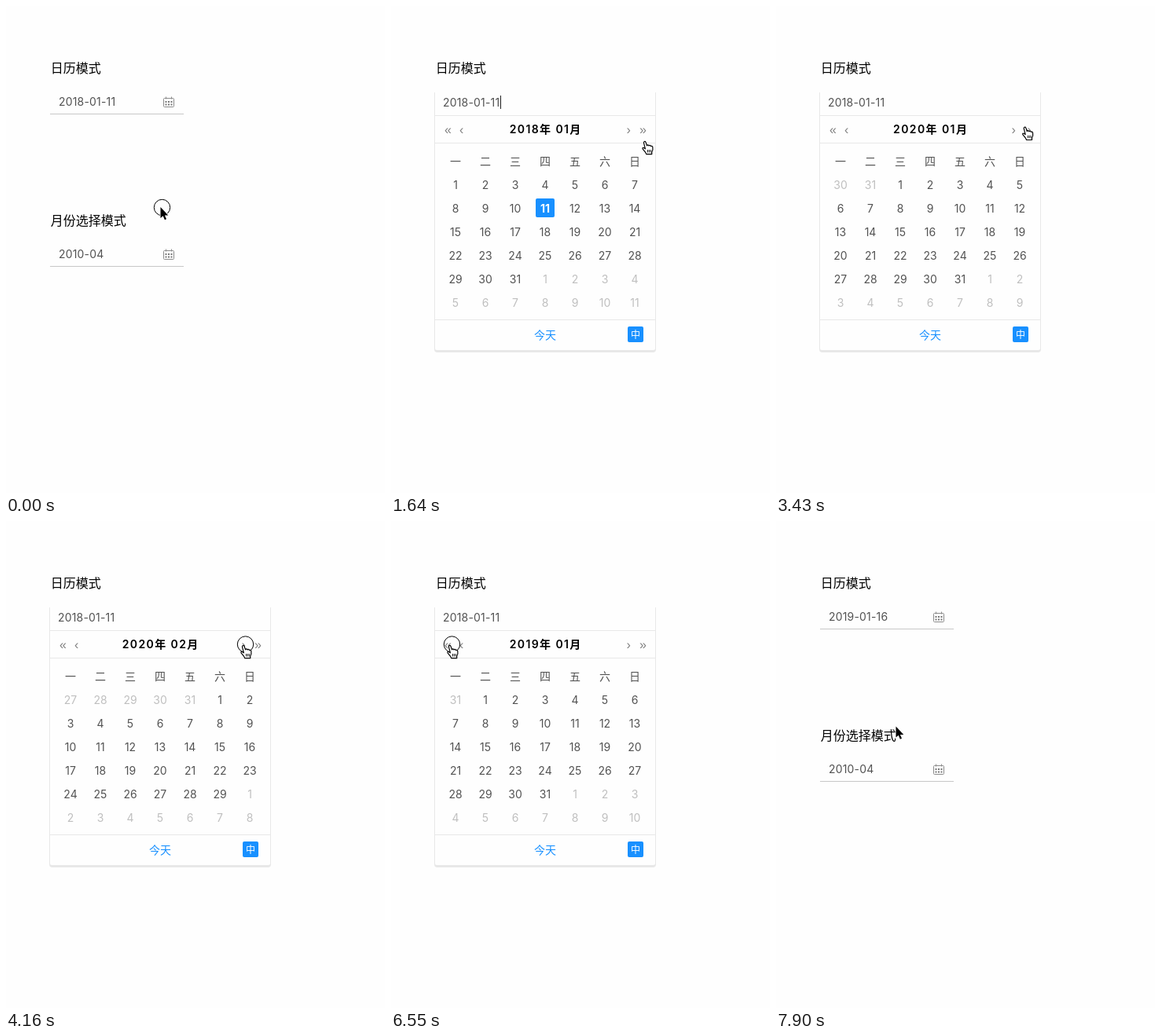
Recreate the animation shown at these times as an HTML page. Size 482 by 620 pixels, loop 8000 ms.

```html
<!DOCTYPE html>
<html lang="zh-CN">
<head>
<meta charset="utf-8">
<title>日历模式</title>
<style>
  html, body { margin: 0; width: 100%; height: 100%; overflow: hidden; background: #fefefe; }
  svg { display: block; width: 482px; height: 620px; }
  text { font: 14px Inter, "Noto Sans CJK SC", "Noto Sans CJK", sans-serif; fill: #525252; }
  .label { font-size: 16px; fill: #000; }
  .date { letter-spacing: .18px; }
  .mid { text-anchor: middle; }
  .title { font-weight: 600; letter-spacing: 1.4px; fill: #000; }
  .nav { font: 16px "Liberation Sans", Arial, sans-serif; fill: #808080; }
  .dim { fill: #bfbfbf; }
  .on { fill: #fff; font-weight: 700; }
  .line { fill: #e8e8e8; }
  .blue { fill: #1890ff; }
  .lang { font-size: 12px; font-weight: 500; fill: #fff; }
  .icon { fill: none; stroke: #8c8c8c; }
  .dots { stroke: #777; stroke-width: 2; stroke-dasharray: 2 1.5; fill: none; }
</style>
</head>
<body>
<svg viewBox="0 0 482 620">
  <defs>
    <g id="cal">
      <rect class="icon" x=".5" y="2.5" width="13" height="11" rx="1"/>
      <path class="icon" d="M3.5 .5v3M10.5 .5v3"/>
      <path class="dots" d="M2.5 7h9M2.5 10.5h9"/>
    </g>
  </defs>

  <text class="label" x="56.7" y="85">日历模式</text>

  <g id="closed">
    <text id="value" class="date" x="67" y="127"></text>
    <use href="#cal" x="200" y="115"/>
    <rect id="under" x="56" y="137" width="170" height="1"/>
    <text class="label" x="56.7" y="279">月份选择模式</text>
    <text class="date" x="67" y="321">2010-04</text>
    <use href="#cal" x="200" y="309"/>
    <rect x="56" y="331" width="170" height="1" fill="#c8c8c8"/>
  </g>

  <g id="popup">
    <path d="M55 110V437q0 4 4 4H333q4 0 4-4V110z" fill="#e8e8e8"/>
    <path d="M56 109V436q0 2 2 2H334q2 0 2-2V109z" fill="#fefefe"/>
    <text id="field" class="date" x="66" y="128"></text>
    <rect id="caret" x="139" y="114" width="1" height="17" fill="#222"/>
    <rect class="line" x="56" y="139" width="280" height="1"/>
    <rect class="line" x="56" y="174" width="280" height="1"/>
    <rect class="line" x="56" y="399" width="280" height="1"/>
    <text class="nav" x="68" y="163">«</text>
    <text class="nav" x="87" y="163">‹</text>
    <text class="nav" x="299.5" y="163">›</text>
    <text class="nav" x="316" y="163">»</text>
    <text id="month" class="title mid" x="196.7" y="162"></text>
    <rect id="cell" width="24" height="24" rx="2"/>
    <g id="grid"></g>
    <text class="mid blue" x="196" y="424">今天</text>
    <rect class="blue" x="301" y="408" width="20" height="20" rx="2"/>
    <text class="mid lang" x="311" y="422.6">中</text>
  </g>

  <circle id="ring" r="10.2" fill="none" stroke="#000"/>
  <path id="arrow" d="M0 0V14L3.200 11.200L5.400 16.200L7.500 15.300L5.400 10.400H9.800z" fill="#000" stroke="#fff" paint-order="stroke" stroke-width="1.4"/>
  <path id="beam" d="M-3 -7.500q3 0 3 2.500V5.500q0 2.500-3 2.500M3 -7.500q-3 0-3 2.500V5.500q0 2.500 3 2.500M-1.500 2.500h3" fill="none" stroke="#000"/>
  <g id="hand" fill="#fff" stroke="#000" stroke-linejoin="round">
    <path stroke-width="1.2" d="M2.500 2.800C2 .8 4.300 .2 5 1.900L6.500 6.300C6.900 5 8.700 5.200 9 6.500C9.500 5.500 11.100 5.800 11.500 7.100C12.100 6.400 13.600 6.800 13.800 8.100C14.400 11 14 12.600 12.700 14.700V17.200H5.700C5.400 15.300 2.800 12.600 1.200 10.600C.3 9.200 1.600 8.300 2.900 9.200L4.400 10.300z"/>
    <path d="M7.500 11.500v3.500M9.400 11.500v3.500M11.300 11.500v3.500" stroke-width=".9"/>
  </g>
</svg>
<script>
const LOOP = 8000, STEP = 149;
const $ = id => document.getElementById(id);
const show = (id, on) => $(id).style.display = on ? '' : 'none';
const place = (id, x, y) => $(id).setAttribute('transform', `translate(${x} ${y})`);

// pointer stops: step, x, y
const path = [
  [0, 198.5, 256.5], [1, 197, 240], [3, 165, 118], [5, 165, 118],
  [9, 326, 174], [10, 326, 174], [11, 325.5, 171], [15, 322, 152],
  [22, 322, 152], [26, 304.5, 157], [29, 304.5, 157], [33, 82, 161],
  [34, 82, 161], [35, 85.5, 158.5], [36, 90.5, 158], [40, 90.5, 158],
  [42, 77.5, 157], [45, 77.5, 157], [50, 157, 285], [52, 157, 285], [53, 154.5, 262]
];
const clicks = [0, 5, 18, 21, 28, 38, 44, 52];
// month shown from each step on
const pages = [[0, 2018, 1], [18, 2019, 1], [21, 2020, 1], [28, 2020, 2], [38, 2020, 1], [44, 2019, 1]];
const OPEN = 6, PICK = 52, CLOSE = 53;

function pointer(n) {
  const i = path.findIndex(p => p[0] > n);
  if (i < 0) return path[path.length - 1].slice(1);
  const [a, ax, ay] = path[i - 1], [b, bx, by] = path[i];
  const u = (n - a) / (b - a), e = u * u * (3 - 2 * u);
  return [ax + (bx - ax) * e, ay + (by - ay) * e];
}

const colX = c => 82 + 38 * c;
const rowY = r => 228 + 30 * r;

function addText(x, y, str) {
  const t = document.createElementNS('http://www.w3.org/2000/svg', 'text');
  t.setAttribute('x', x);
  t.setAttribute('y', y);
  t.setAttribute('class', 'mid');
  t.textContent = str;
  $('grid').append(t);
  return t;
}
[...'一二三四五六日'].forEach((d, c) => addText(colX(c), 203.3, d));
const days = Array.from({ length: 42 }, (_, i) => addText(colX(i % 7), rowY(i / 7 | 0) + 5, ''));

function drawMonth(year, month, picked, x, y) {
  $('month').textContent = `${year}年 ${String(month).padStart(2, '0')}月`;
  const lead = (new Date(year, month - 1, 1).getDay() + 6) % 7;
  let mark = -1, hover = -1;
  days.forEach((t, i) => {
    const d = new Date(year, month - 1, i - lead + 1);
    const own = d.getMonth() === month - 1;
    const sel = own && d.getFullYear() === picked[0] && month === 1 && d.getDate() === picked[1];
    t.textContent = d.getDate();
    t.setAttribute('class', 'mid' + (sel ? ' on' : own ? '' : ' dim'));
    if (sel) mark = i;
    if (Math.abs(x - colX(i % 7)) < 12 && Math.abs(y - rowY(i / 7 | 0)) < 12) hover = i;
  });
  const at = mark < 0 ? hover : mark;
  show('cell', at >= 0);
  if (at >= 0) {
    place('cell', colX(at % 7) - 12, rowY(at / 7 | 0) - 13);
    $('cell').setAttribute('fill', mark < 0 ? '#e6f7ff' : '#1890ff');
  }
}

function draw(n) {
  const [x, y] = pointer(n);
  const open = n >= OPEN && n < CLOSE;
  const date = n >= PICK ? '2019-01-16' : '2018-01-11';
  show('popup', open);
  show('closed', !open);
  $('value').textContent = $('field').textContent = date;
  $('under').setAttribute('fill', n >= 3 && n < OPEN ? '#40a9ff' : '#c8c8c8');
  show('caret', n < 8 || (n >= 11 && n < 15));
  const [, year, month] = pages.filter(p => p[0] <= n).pop();
  drawMonth(year, month, n >= PICK ? [2019, 16] : [2018, 11], x, y);

  const kind = n < 3 || n >= CLOSE ? 'arrow' : y < 137 ? 'beam' : 'hand';
  ['arrow', 'beam', 'hand'].forEach(k => show(k, k === kind));
  place('arrow', x - 2, y - .5);
  place('beam', x, y + .5);
  place('hand', x - 6.5, y + .5);
  show('ring', clicks.includes(n));
  place('ring', x, y);
}

let last = -1;
function tick() {
  const t = performance.now() % LOOP;
  const n = Math.min(CLOSE, Math.floor(t / STEP + .1));
  if (n !== last) draw(last = n);
  requestAnimationFrame(tick);
}
tick();
</script>
</body>
</html>
```
